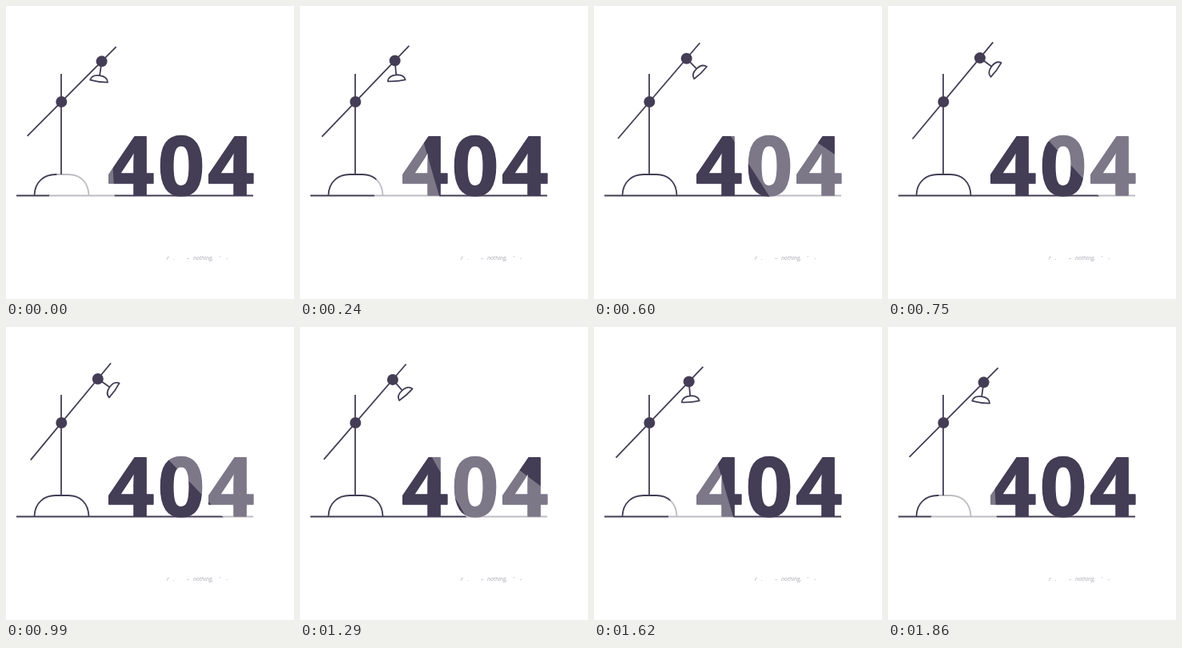
An HTML page with a canvas that plays this animation: 360x367 px, repeating every 1.89 s.

```html
<!DOCTYPE html>
<html lang="en">
<head>
<meta charset="utf-8">
<title>404</title>
<style>
  html, body { margin: 0; height: 100%; overflow: hidden; background: #fff; }
  canvas { display: block; }
</style>
</head>
<body>
<canvas id="stage" width="360" height="367"></canvas>
<script>
const ctx = document.getElementById('stage').getContext('2d');
const LOOP = 1890, STEP = 30, PEAK = 930, HOLD = 100, SWING = 840;
const INK = '#433d55';
const RAD = Math.PI / 180;
const PIVOT = { x: 69.3, y: 120 };
const base = new Path2D('M35.5 237C36 220 48 211 62 211H78C92 211 103 220 103.5 237');
const shade = new Path2D('M-11 25C-10 20 -5 18 0 18C5 18 10 20 11 25Q0 26.5 -11 25Z');
const beam = new Path2D('M-11 25L-92 425H92L11 25Z');

const mix = (a, b, p) => a + (b - a) * p;

// 0 with the lamp pointing down, 1 with it turned fully to the right
function swing(t) {
  const d = (Math.abs(t - PEAK) - HOLD) / SWING;
  return (1 + Math.cos(Math.PI * Math.min(1, Math.max(0, d)))) / 2;
}

function line(x1, y1, x2, y2) {
  ctx.beginPath();
  ctx.moveTo(x1, y1);
  ctx.lineTo(x2, y2);
  ctx.stroke();
}

function dot(x, y) {
  ctx.beginPath();
  ctx.arc(x, y, 7, 0, 7);
  ctx.fill();
}

function inHead(joint, tilt, draw) {
  ctx.save();
  ctx.translate(joint.x, joint.y);
  ctx.rotate(tilt);
  draw();
  ctx.restore();
}

function drawDigits() {
  ctx.font = '700 102.5px "Open Sans", "Noto Sans", sans-serif';
  ctx.lineWidth = 1.5;
  [['4', 127], ['0', 189.7], ['4', 252]].forEach(([digit, x]) => {
    ctx.fillText(digit, x, 237);
    ctx.strokeText(digit, x, 237);
  });
}

function drawCaption() {
  ctx.font = 'italic 7px "Open Sans", sans-serif';
  ctx.fillStyle = '#aaa8b0';
  [['r', 201], ['.', 209], ['–', 226], ['nothing,', 234], ["'", 266], ['-', 275]]
    .forEach(([text, x]) => ctx.fillText(text, x, 318));
}

function draw(t) {
  const p = swing(t);
  const arm = mix(45.2, 50.4, p) * RAD;
  const tilt = mix(8, -55, p) * RAD;
  const along = r => ({ x: PIVOT.x + r * Math.cos(arm), y: PIVOT.y - r * Math.sin(arm) });
  const tail = along(-60.5), tip = along(97), joint = along(71.4);
  const light = alpha => inHead(joint, tilt, () => {
    ctx.fillStyle = `rgba(255,255,255,${alpha})`;
    ctx.fill(beam);
  });

  ctx.fillStyle = '#fff';
  ctx.fillRect(0, 0, 360, 367);
  ctx.strokeStyle = INK;
  ctx.lineJoin = 'round';
  ctx.lineWidth = 1.8;
  line(13, 237.5, 309, 237.5);
  ctx.stroke(base);

  // thin lines fade more in the beam than the digits do
  light(0.5);
  ctx.fillStyle = INK;
  drawDigits();
  light(0.3);

  ctx.fillStyle = INK;
  ctx.lineWidth = 1.8;
  line(69, 85, 69, 211);
  line(tail.x, tail.y, tip.x, tip.y);
  dot(PIVOT.x, PIVOT.y);
  dot(joint.x, joint.y);
  inHead(joint, tilt, () => {
    line(0, 0, 0, 18);
    ctx.fillStyle = '#fff';
    ctx.fill(shade);
    ctx.stroke(shade);
  });
  drawCaption();
}

const start = performance.now();
function frame() {
  const t = (performance.now() - start) % LOOP;
  draw(Math.floor(t / STEP) * STEP);
  requestAnimationFrame(frame);
}
frame();
</script>
</body>
</html>
```
